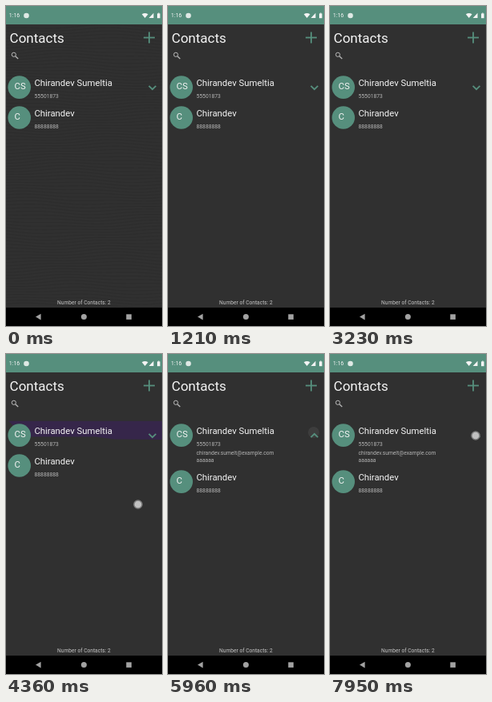
Animation, 195 px wide and 400 px high, one loop 8 s. Source, as an HTML page with a canvas:

```html
<!DOCTYPE html>
<html lang="en">
<head>
<meta charset="utf-8">
<title>Contacts</title>
<style>
html, body { margin: 0; width: 100%; height: 100%; overflow: hidden; background: #303030; }
canvas { display: block; width: 195px; height: 400px; }
</style>
</head>
<body>
<canvas id="stage"></canvas>
<script>
const W = 195, H = 400, LOOP = 8000;
const GREEN = '#568f7d', WHITE = '#f4f4f4', GREY = '#b4b4b4', NAV = '#a2a2a2';
const canvas = document.getElementById('stage');
const ctx = canvas.getContext('2d');
const dpr = window.devicePixelRatio || 1;
canvas.width = W * dpr;
canvas.height = H * dpr;

const ramp = (t, a, b) => Math.max(0, Math.min(1, (t - a) / (b - a)));
const ease = p => p * p * (3 - 2 * p);
const pulse = (t, a, b, c, d) => ramp(t, a, b) * (1 - ramp(t, c, d));

function text(str, x, y, size, color = WHITE, align = 'left') {
  ctx.font = `${size}px Roboto, Inter, sans-serif`;
  ctx.textAlign = align;
  ctx.fillStyle = color;
  ctx.fillText(str, x, y);
}

function disc(x, y, r, color) {
  ctx.fillStyle = color;
  ctx.beginPath();
  ctx.arc(x, y, r, 0, Math.PI * 2);
  ctx.fill();
}

function poly(color, ...pts) {
  ctx.fillStyle = color;
  ctx.beginPath();
  pts.forEach(([x, y]) => ctx.lineTo(x, y));
  ctx.fill();
}

function line(color, width, ...pts) {
  ctx.strokeStyle = color;
  ctx.lineWidth = width;
  ctx.beginPath();
  pts.forEach(([x, y]) => ctx.lineTo(x, y));
  ctx.stroke();
}

// wood grain, which soon flattens into plain grey
function background(t) {
  ctx.fillStyle = '#303030';
  ctx.fillRect(0, 0, W, H);
  const alpha = 0.09 * (1 - ramp(t, 90, 1090));
  if (!alpha) return;
  for (let y = 26; y < 376; y += 4) {
    ctx.strokeStyle = `rgba(0,0,0,${alpha})`;
    ctx.lineWidth = 0.9;
    ctx.beginPath();
    for (let x = 0; x <= W; x += 5) {
      ctx.lineTo(x, y + 2 * Math.sin(x / 38 + y / 23) + Math.sin(x / 17 - y / 11));
    }
    ctx.stroke();
  }
}

function statusBar() {
  ctx.fillStyle = GREEN;
  ctx.fillRect(0, 0, W, 23);
  text('1:16', 3.8, 14.4, 7);
  disc(25.5, 12, 3.3, '#dfe9e5');
  ctx.fillStyle = WHITE;
  ctx.beginPath();
  ctx.moveTo(173.7, 15);
  ctx.lineTo(169.8, 10.3);
  ctx.quadraticCurveTo(173.7, 7.6, 177.6, 10.3);
  ctx.fill();
  poly(WHITE, [184.5, 8.8], [184.5, 15], [178.6, 15]);
  ctx.fillRect(189, 9.4, 3.6, 5.8);
  ctx.fillRect(190, 8.6, 1.6, 1);
}

function header() {
  text('Contacts', 4.6, 46.3, 17);
  line(GREEN, 1.8, [172, 39.5], [186, 39.5]);
  line(GREEN, 1.8, [179, 32.5], [179, 46.5]);
  ctx.strokeStyle = '#b8b8b8';
  ctx.lineWidth = 1;
  ctx.beginPath();
  ctx.arc(9.8, 60.8, 2.6, 0, Math.PI * 2);
  ctx.stroke();
  line('#b8b8b8', 1.2, [11.7, 62.7], [15.2, 66]);
}

function navBar() {
  text('Number of Contacts: 2', 97.4, 373, 6.65, '#c4c4c4', 'center');
  ctx.fillStyle = '#000';
  ctx.fillRect(0, 377, W, 23);
  poly(NAV, [37, 388.6], [43.6, 384.8], [43.6, 392.4]);
  disc(97.4, 388.6, 3.5, NAV);
  ctx.fillStyle = NAV;
  ctx.fillRect(150.3, 385.3, 6.6, 6.6);
}

function contact(y, initials, x, name, phone) {
  disc(16.7, y, 14.3, GREEN);
  text(initials, x, y + 2.1, 11.3);
  text(name, 35.4, y - 1.6, 11.35);
  text(phone, 35.6, y + 13, 6.7, GREY);
}

function touch(x, y, alpha) {
  if (!alpha) return;
  ctx.globalAlpha = alpha;
  disc(x, y, 5.8, '#7c7c7c');
  disc(x, y, 4.3, '#c0c0c0');
  ctx.globalAlpha = 1;
}

function draw(t) {
  ctx.setTransform(dpr, 0, 0, dpr, 0, 0);
  background(t);
  statusBar();
  header();

  const open = ease(ramp(t, 5560, 5800));
  const glow = pulse(t, 4180, 4300, 4420, 4580);
  if (glow) {
    ctx.globalAlpha = glow;
    poly('#36264a', [3, 83.7], [195, 83.7], [195, 107], [135, 106.5], [112, 103.5], [24, 103.5]);
    ctx.globalAlpha = 1;
  }

  contact(101.6, 'CS', 10.6, 'Chirandev Sumeltia', '55501873');
  if (open) {
    ctx.globalAlpha = open;
    text('chirandev.sumelt@example.com', 35.6, 125.7, 6.7, GREY);
    text('aaaaaa', 35.6, 134.8, 6.7, GREY);
    ctx.globalAlpha = 1;
  }
  contact(139.5 + 20.1 * open, 'C', 10.4, 'Chirandev', '88888888');

  const ripple = pulse(t, 5560, 5700, 5920, 6120);
  if (ripple) disc(182, 98, 7, `rgba(90,90,90,${0.4 * ripple})`);
  const dip = 2.2 * (1 - 2 * open);
  line(GREEN, 1.8, [178.6, 102 - dip], [183, 102 + dip], [187.4, 102 - dip]);

  touch(165, 188, pulse(t, 4150, 4230, 4480, 4580));
  touch(182, 102, pulse(t, 5420, 5480, 5620, 5720));
  touch(182, 102, ramp(t, 7850, 7930));
  navBar();
}

function frame(now) {
  draw(now % LOOP);
  requestAnimationFrame(frame);
}
draw(0);
requestAnimationFrame(frame);
</script>
</body>
</html>
```
